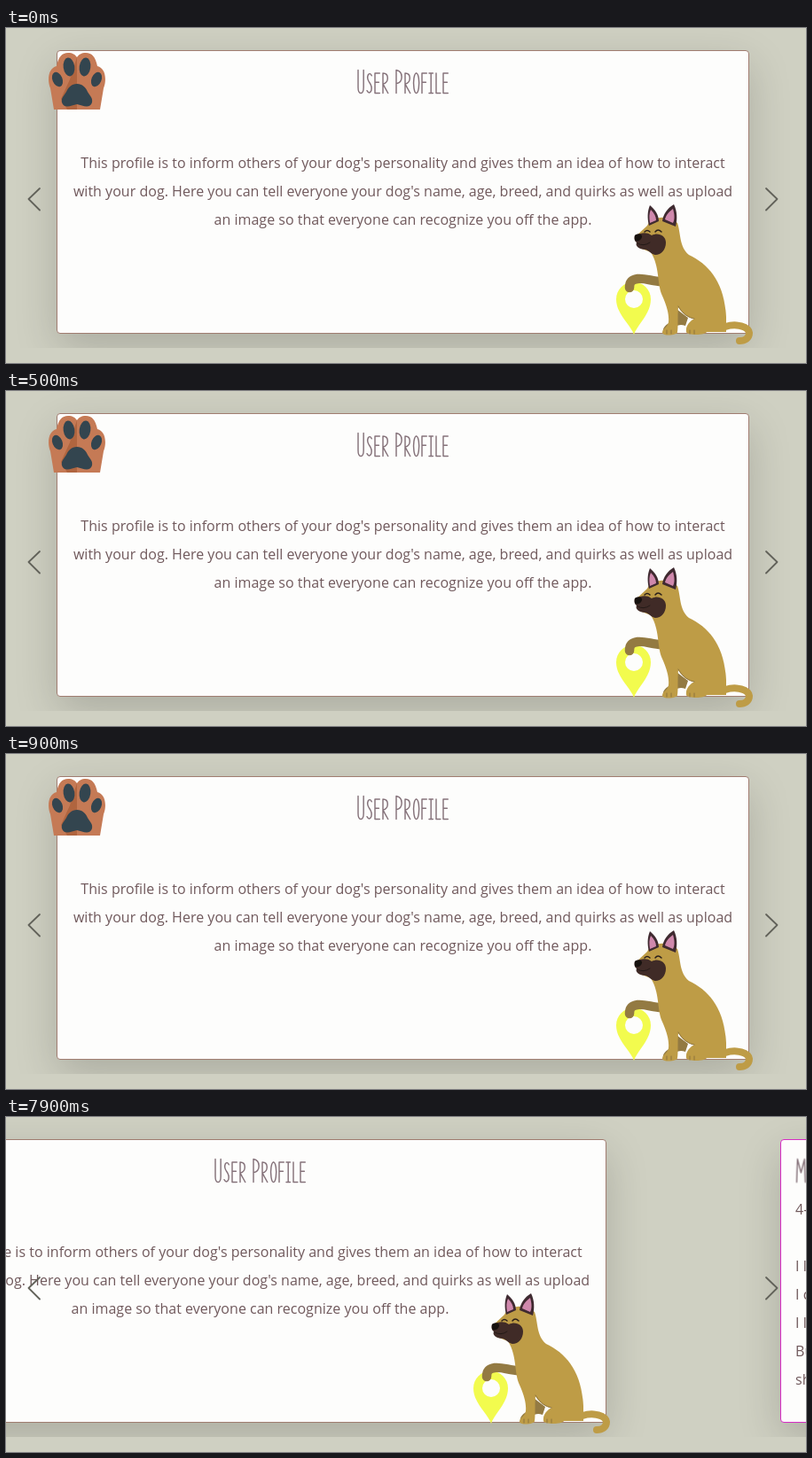
These frames come from a looping animation (902 by 378 pixels, 8000 ms). An HTML page:

```html
<!DOCTYPE html>
<html lang="en">
<head>
<meta charset="utf-8">
<title>User Profile</title>
<style>
  html, body { margin: 0; width: 100%; height: 100%; overflow: hidden; background: #cfd0c2; }
  #stage { position: relative; width: 902px; height: 378px; overflow: hidden; }
  #view { position: absolute; inset: 0 0 17px; overflow: hidden; }
  #track { position: absolute; inset: 0; }
  svg { position: absolute; left: 0; top: 0; overflow: visible; }
  .card {
    position: absolute; top: 25px; box-sizing: border-box; width: 781px; height: 320px;
    border: 1px solid #a07c70; border-radius: 4px;
    background: #fdfdfc; box-shadow: 0 16px 48px rgba(0, 0, 0, .175);
  }
  .next { border-color: #d62cc4; }
  p {
    position: absolute; left: 16px; right: 16px; margin: 0; white-space: nowrap;
    font: 16px/32px "Open Sans", sans-serif; letter-spacing: .015px; color: #70595c;
  }
  .center { text-align: center; left: 0; right: 0; }
  .lettering path {
    fill: none; stroke: #85727a; stroke-width: 1.45; vector-effect: non-scaling-stroke;
    stroke-linecap: round; stroke-linejoin: round;
  }
</style>
</head>
<body>
<div id="stage">
  <div id="view">
    <div id="track">
      <div class="card" style="left:57px">
        <p class="center" style="top:110px">This profile is to inform others of your dog's personality and gives them an idea of how to interact<br>with your dog. Here you can tell everyone your dog's name, age, breed, and quirks as well as upload<br>an image so that everyone can recognize you off the app.</p>
      </div>
      <div class="card next" style="left:1034px">
        <p style="top:62px">4-year</p>
        <p style="top:126px">I like to run<br>I can fetch<br>I like to nap<br>But not for long<br>she said</p>
      </div>
      <svg width="902" height="378">
        <g id="title" class="lettering" role="img" aria-label="User Profile"></g>
        <g id="nextTitle" class="lettering" role="img" aria-label="M"></g>

        <g id="paw">
          <path fill="#c57a55" d="M54 92L50 68C46 58 48 45 57 43C59 33 63 28 70 28C75 28 78 30 80 33C82 30 85 28 90 28C97 28 101 33 103 43C112 45 114 58 110 68L106 92Z"/>
          <path fill="#b0653f" d="M80 33V92H69L62 80L72 58Z"/>
          <g fill="#33454f">
            <ellipse cx="71" cy="44" rx="6.3" ry="10.5" transform="rotate(-8 71 44)"/>
            <ellipse cx="89" cy="44" rx="6.3" ry="10.5" transform="rotate(8 89 44)"/>
            <ellipse cx="58" cy="58" rx="5.6" ry="8.6" transform="rotate(-22 58 58)"/>
            <ellipse cx="102" cy="58" rx="5.6" ry="8.6" transform="rotate(22 102 58)"/>
            <path d="M80 63C86 63 90 67 92 72C95 77 98 79 97 84C95 91 87 88 80 86C73 88 65 91 63 84C62 79 65 77 68 72C70 67 74 63 80 63Z"/>
          </g>
        </g>

        <g id="dog" stroke-linecap="round" stroke-linejoin="round">
          <path fill="#f2fb4e" fill-rule="evenodd" d="M708 346C704 334 688 323 688 306A19.5 19.5 0 0 1 727 306C727 323 712 334 708 346ZM718 306A10 10 0 1 0 698 306A10 10 0 1 0 718 306Z"/>
          <path fill="none" stroke="#937a42" stroke-width="10.5" d="M739 286C729 286 721 282 712 283C705 284 703 287 703 293"/>
          <path fill="#937a42" d="M752 314L769 327L766 336C758 333 754 337 752 343H741C740 338 744 335 749 332Z"/>
          <path fill="none" stroke="#be9c46" stroke-width="8" d="M811 337C824 333 837 337 838 344C838 350 833 353 827 353"/>
          <path fill="#be9c46" d="M723 223C727 213 746 210 757 220C761 232 759 247 770 256C793 267 810 287 812 326L812 343H767C766 336 771 331 776 328C768 327 762 321 758 315C757 326 758 335 757 343C757 347 741 348 740 344C740 339 746 338 747 332C748 322 744 311 739 300C734 286 737 269 727 253L714 248L709 236Z"/>
          <path fill="#be9c46" d="M768 337H790V343C788 347 768 347 767 343Z"/>
          <path fill="none" stroke="#8c723c" stroke-width="1" d="M758 314C763 323 770 327 776 328M745 341V345M750 341V345M771 341V345M776 341V345"/>
          <path fill="#3f2a30" d="M726 200C732 205 736 211 736 218L725 223C723 215 723 207 726 200ZM753 199C757 207 757 216 755 224L740 218C741 210 746 203 753 199Z"/>
          <path fill="#cf88ac" d="M727 205C731 209 733 213 733 217L726 220C725 214 725 209 727 205ZM752 204C754 211 754 216 752 220L743 216C744 211 748 207 752 204Z"/>
          <path fill="#402b27" d="M709 234C717 231 722 230 728 234C735 230 744 234 744 242C744 250 739 256 732 256C727 255 725 251 721 250C714 250 709 246 711 242C708 240 708 236 709 234Z"/>
          <path fill="#17120f" d="M709 234C713 231 718 233 717 236C716 240 711 242 709 239Z"/>
          <path fill="none" stroke="#2a1f1b" stroke-width="1.5" d="M720 230Q723 227 726 230M732 230Q735 226 739 230"/>
          <path fill="none" stroke="#241a17" stroke-width="1" d="M712 243Q719 247 726 242"/>
        </g>
      </svg>
    </div>
    <svg width="902" height="378" fill="none" stroke="#62625a" stroke-width="1.8" stroke-linecap="round" stroke-linejoin="round">
      <path d="M38 181L25.5 193L38 205.5M857 181L869.5 193L857 205.5"/>
    </svg>
  </div>
</div>
<script>
  // Narrow hand lettering: single strokes on a 24-unit-high box.
  const glyphs = {
    U: "M0 0V18Q0 24 3.5 24T7 18V0",
    S: "M6 3Q4 -1 1.5 2Q-.5 6 3 11Q7 16 5.5 21Q3 26 0 21",
    E: "M6 0H0V24H6M0 11H5",
    R: "M0 24V0Q6 0 6 6Q6 12 0 13L6.5 24",
    P: "M0 24V0Q7 1 7 7Q7 13 0 14",
    O: "M3.5 0A3.5 12 0 1 0 3.6 0",
    F: "M0 24V0H6M0 11H5",
    I: "M0 0H5M2.5 0V24M0 24H5",
    L: "M0 0V24H5.5",
    M: "M0 24L1 0L5.5 14L10 0L11 24"
  };

  function letter(id, word, xs, capitals) {
    const group = document.getElementById(id);
    [...word].forEach((char, i) => {
      const size = capitals.includes(i) ? 1.08 : 0.94;
      const path = document.createElementNS("http://www.w3.org/2000/svg", "path");
      path.setAttribute("d", glyphs[char]);
      path.setAttribute("transform", `translate(${xs[i]} ${73.5 - 24 * size}) scale(.88 ${size})`);
      group.append(path);
    });
  }

  letter("title", "USERPROFILE", [397, 407, 416, 425, 440, 450, 459.5, 469, 477, 485, 493], [0, 4]);
  letter("nextTitle", "M", [1052.5], [0]);

  // The slide starts late in the loop, in hard steps: [time in ms, x].
  const duration = 8000;
  const steps = [[0, 0], [7800, -40], [7900, -161], [duration, -161]];
  document.getElementById("track").animate(
    steps.map(([time, x]) => ({
      offset: time / duration,
      transform: `translateX(${x}px)`,
      easing: "steps(1, end)"
    })),
    { duration, iterations: Infinity }
  );
</script>
</body>
</html>
```
